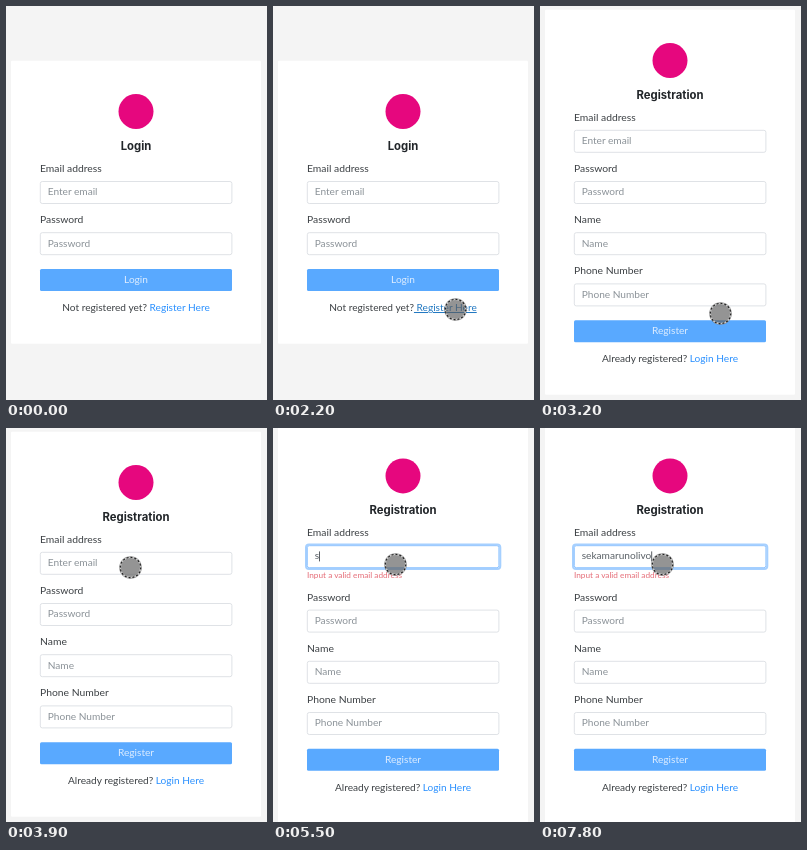
Recreate the animation shown at these times as an HTML page. Size 261x394 px, loop 8 s.

```html
<!DOCTYPE html>
<html lang="en">
<head>
<meta charset="utf-8">
<title>Registration form</title>
<style>
  html, body { margin: 0; width: 100%; height: 100%; overflow: hidden; background: #f4f4f4; }
  svg { display: block; width: 100%; height: 100%; }
  text { font: 10.15px Lato, "Open Sans", sans-serif; fill: #3c4044; white-space: pre; }
  .label { font-size: 10.35px; }
  .mid { text-anchor: middle; }
  .title { font: 700 11.3px Inter, "Open Sans", sans-serif; fill: #212529; }
  .hint { fill: #8b9298; }
  .value { fill: #5a6167; }
  .error { font-size: 8.25px; fill: #e56c77; }
  .action { fill: #dcecff; }
  .link { fill: #2a90ff; }
  .link.hover { fill: #2379c2; text-decoration: underline; text-decoration-thickness: .6px; }
  .field { fill: #fff; stroke: #dfe2e6; }
</style>
</head>
<body>
<svg id="stage" viewBox="0 0 261 394"></svg>
<script>
const LOOP = 8000, TICK = 100, PITCH = 51.2;
const stage = document.getElementById('stage');

const text = (x, y, cls, str) => `<text x="${x}" y="${y}" class="${cls}">${str}</text>`;

const row = (n, label, hint, id = '') => {
  const y = 115 + n * PITCH;
  return `
  ${text(34, y - .2, 'label', label)}
  <rect ${id && `id="${id}"`} class="field" x="34.3" y="${y + 9.3}" width="191.6" height="22" rx="2"/>
  ${text(41.7, y + 23.2, 'hint', hint)}`;
};

const header = (y, title) => `
  <circle cx="130" cy="${y}" r="17.5" fill="#e6077e"/>
  ${text(130, y + 38.5, 'mid title', title)}`;

const footer = (y, action, question, link, id) => `
  <rect x="34" y="${y}" width="192" height="22" rx="1.5" fill="#59a9ff"/>
  ${text(130, y + 14.2, 'mid action', action)}
  <text x="130" y="${y + 42}" class="mid">${question}<tspan id="${id}" class="link"> ${link}</tspan></text>`;

stage.innerHTML = `
  <rect width="261" height="394" fill="#f4f4f4"/>
  <g id="login">
    <rect x="5" y="54.7" width="250" height="283" rx="1" fill="#fff"/>
    ${header(105.5, 'Login')}
    ${row(1, 'Email address', 'Enter email')}
    ${row(2, 'Password', 'Password')}
    ${footer(263, 'Login', 'Not registered yet?', 'Register Here', 'toRegister')}
  </g>
  <g id="register">
    <rect id="card" x="5" width="250" rx="1" fill="#fff"/>
    <g id="upper">
      ${header(54.5, 'Registration')}
      <rect id="glow" x="33" y="123" width="194.3" height="24.6" rx="3" fill="none" stroke="#a6d0ff" stroke-width="2"/>
      ${row(0, 'Email address', 'Enter email', 'email')}
      ${text(41.7, 138, 'value', '')}
      <rect id="caret" y="130" width=".8" height="10" fill="#30363c"/>
    </g>
    ${text(34, 150.2, 'error', 'Input a valid email address')}
    <g id="lower">
      ${row(1, 'Password', 'Password')}
      ${row(2, 'Name', 'Name')}
      ${row(3, 'Phone Number', 'Phone Number')}
      ${footer(314.2, 'Register', 'Already registered?', 'Login Here', 'toLogin')}
    </g>
  </g>
  <g id="pointer">
    <circle r="11.3" fill="#5c5c5c" fill-opacity=".66"/>
    <circle r="10.2" fill="none" stroke="#c8c8c8" stroke-width="1.3"/>
    <circle r="10.2" fill="none" stroke="#222" stroke-width="1.2" pathLength="64" stroke-dasharray="2 2"/>
  </g>`;

const $ = id => document.getElementById(id);
const [login, register, card, upper, lower, glow, email, caret, pointer, toRegister] =
  ['login', 'register', 'card', 'upper', 'lower', 'glow', 'email', 'caret', 'pointer', 'toRegister'].map($);
const value = upper.querySelector('.value');
const hint = upper.querySelector('.hint');
const error = register.querySelector('.error');

const show = (el, on) => el.setAttribute('visibility', on ? 'inherit' : 'hidden');
const clamp = v => Math.max(0, Math.min(1, v));

// Pointer path: time, x, y
const path = [
  [500, 243.5, 351.5], [700, 222, 334], [900, 199, 315], [1100, 189.5, 306.5], [1200, 189.5, 306.5],
  [1300, 183, 305.5], [1500, 190.3, 304.5], [1900, 190.3, 304.5], [2000, 182.5, 303.5],
  [2800, 182.5, 303.5], [3000, 184.5, 308], [3200, 180.5, 307.5], [3300, 172, 289],
  [3500, 143, 195], [3600, 131, 158], [3700, 126.5, 142.5], [4100, 122.5, 136.5]
];

function pointerAt(t) {
  const i = path.findIndex(p => p[0] > t);
  if (i < 0) return path[path.length - 1].slice(1);
  if (i === 0) return path[0].slice(1);
  const [a, b] = [path[i - 1], path[i]];
  const k = (t - a[0]) / (b[0] - a[0]);
  return [1, 2].map(n => a[n] + (b[n] - a[n]) * k);
}

const NAME = 'sekamarunolivo';
const keys = [5500, 5700, 5800, 5900, 6600, 6700, 6800, 6900, 7100, 7200, 7300, 7500, 7700, 7800];

function render(time) {
  const t = Math.floor(time / TICK) * TICK;
  const onForm = t >= 2400;
  show(login, !onForm);
  show(register, onForm);
  toRegister.classList.toggle('hover', t >= 2200);

  // The error line makes the centred card taller
  const typed = keys.filter(k => k <= t).length;
  const shift = typed ? 6.6 : 0;
  card.setAttribute('y', 3.7 - shift);
  card.setAttribute('height', 385 + 2 * shift);
  upper.setAttribute('transform', `translate(0 ${-shift})`);
  lower.setAttribute('transform', `translate(0 ${shift})`);
  show(error, typed);
  show(hint, !typed);
  value.textContent = NAME.slice(0, typed);

  const focus = clamp((t - 4450) / 150);
  glow.setAttribute('opacity', focus);
  email.style.stroke = focus ? '#8fc4ff' : '';

  // The caret blinks from the latest key press
  const since = t - (typed ? keys[typed - 1] : 4500);
  show(caret, onForm && since >= 0 && since % 1000 < 500);
  caret.setAttribute('x', 41.7 + (typed ? value.getComputedTextLength() : 0));

  show(pointer, t >= 500);
  pointer.setAttribute('transform', `translate(${pointerAt(t)})`);
}

const start = performance.now();
function loop() {
  render((performance.now() - start) % LOOP);
  requestAnimationFrame(loop);
}
loop();
</script>
</body>
</html>
```
